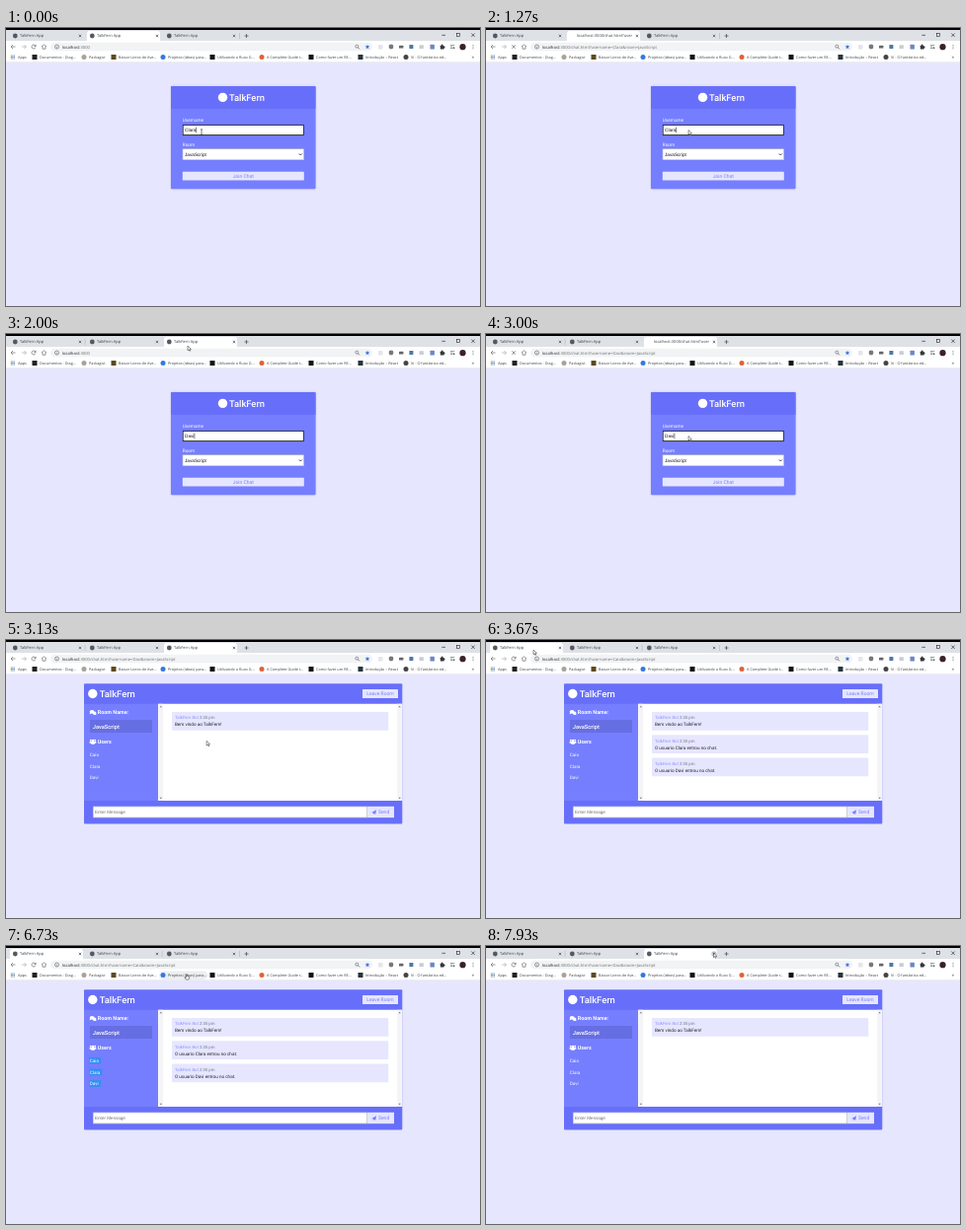
Animation of 480x282 px, one loop 8 s. Source, as an HTML page with a canvas:

```html
<!DOCTYPE html>
<html lang="pt">
<head>
<meta charset="utf-8">
<title>TalkFern App</title>
<style>
html, body { margin: 0; width: 100%; height: 100%; overflow: hidden; background: #e6e6ff; }
canvas { display: block; width: 480px; height: 282px; }
</style>
</head>
<body>
<canvas id="stage"></canvas>
<script>
const W = 480, H = 282, LOOP = 8000;
const canvas = document.getElementById('stage');
const ctx = canvas.getContext('2d');
const ratio = window.devicePixelRatio || 1;
canvas.width = W * ratio;
canvas.height = H * ratio;

const UI = '"Open Sans", "Noto Sans", sans-serif';
const PAGE = 'Roboto, sans-serif';
const FORM = '"Liberation Sans", Arial, sans-serif';
const DARK = '#676ffa', MID = '#757efe', LIGHT = '#e6e6ff', INK = '#3c4043';
const APP = 'TalkFern';
const USERS = ['Caio', 'Clara', 'Davi'];

// Pointer tip: time, x, y
const PATH = [
  [0, 198, 105.5], [70, 198, 105.5], [400, 200, 104], [670, 200, 104], [800, 205, 103.5],
  [1300, 205, 103.5], [1760, 184, 12], [2130, 184, 12], [2450, 205, 103.5], [3100, 205, 103.5],
  [3580, 48, 10], [3740, 48, 10], [4000, 200, 80], [4240, 236, 122], [4520, 84, 115],
  [4600, 84, 115], [4730, 90, 115], [4870, 90, 115], [5180, 102, 144], [5330, 102, 144],
  [5660, 105, 100], [5730, 105, 100], [5950, 100, 168], [6220, 128, 100], [6530, 156, 36],
  [6720, 183, 29], [6890, 180, 10], [7020, 180, 10], [7400, 78, 24], [7470, 78, 24],
  [7900, 230.5, 7], [8000, 230.5, 7]
];

const BOOKMARKS = [
  [29, 'Documentos - Diag...', '#222', 0], [79, 'Packagist', '#a8a29a', 1],
  [109, 'Baixar Livros de Ave...', '#5c4a20', 0], [159, 'Projetos (ideas) para...', '#3478e0', 1],
  [209, 'Utilizando o fluxo G...', '#111', 0], [259, 'A Complete Guide t...', '#e0603c', 1],
  [309, 'Como fazer um RE...', '#111', 0], [359, 'Introdução – React', '#26343c', 0],
  [405, 'Vi - O fantástico ed...', '#444', 1]
];

function pointer(t) {
  let i = 1;
  while (i < PATH.length - 1 && PATH[i][0] < t) i++;
  const [t0, x0, y0] = PATH[i - 1], [t1, x1, y1] = PATH[i];
  const p = Math.min(1, Math.max(0, (t - t0) / (t1 - t0)));
  const e = p * p * (3 - 2 * p);
  return { x: x0 + (x1 - x0) * e, y: y0 + (y1 - y0) * e };
}

function rect(x, y, w, h, fill, r = 0) {
  ctx.fillStyle = fill;
  ctx.beginPath();
  ctx.roundRect(x, y, w, h, r);
  ctx.fill();
}

function frame(x, y, w, h, color, width) {
  ctx.strokeStyle = color;
  ctx.lineWidth = width;
  ctx.strokeRect(x, y, w, h);
}

function disc(x, y, r, fill) {
  ctx.fillStyle = fill;
  ctx.beginPath();
  ctx.arc(x, y, r, 0, Math.PI * 2);
  ctx.fill();
}

function ring(x, y, r, color, from = 0, to = Math.PI * 2) {
  ctx.strokeStyle = color;
  ctx.lineWidth = 0.65;
  ctx.beginPath();
  ctx.arc(x, y, r, from, to);
  ctx.stroke();
}

function line(points, color, width = 0.65) {
  ctx.strokeStyle = color;
  ctx.lineWidth = width;
  ctx.beginPath();
  for (let i = 0; i < points.length; i += 2) ctx.lineTo(points[i], points[i + 1]);
  ctx.stroke();
}

function shape(points, fill) {
  ctx.fillStyle = fill;
  ctx.beginPath();
  for (let i = 0; i < points.length; i += 2) ctx.lineTo(points[i], points[i + 1]);
  ctx.closePath();
  ctx.fill();
}

function text(s, x, y, size, color, family = PAGE, weight = 400, align = 'left') {
  ctx.font = `${weight} ${size}px ${family}`;
  ctx.textAlign = align;
  ctx.fillStyle = color;
  ctx.fillText(s, x, y);
  return ctx.measureText(s).width;
}

function cross(x, y, r, color) {
  line([x - r, y - r, x + r, y + r], color);
  line([x - r, y + r, x + r, y - r], color);
}

function tabs(s, mouse) {
  rect(0, 0, W, 13, '#dee1e6');
  rect(0, 0, W, 2, '#000');
  for (let i = 0; i < 3; i++) {
    const x = 2 + i * 78;
    const over = mouse.y < 14 && mouse.x > x + 2 && mouse.x < x + 77;
    if (i === s.tab) {
      rect(x + 2, 3, 74, 11, '#fff', [2.5, 2.5, 0, 0]);
    } else if (over) {
      rect(x + 2, 3, 74, 10, '#edeff2', [2.5, 2.5, 0, 0]);
    }
    ctx.save();
    ctx.beginPath();
    ctx.rect(x, 2, 68, 11);
    ctx.clip();
    if (i === s.tab && s.loading) {
      text('localhost:3000/chat.html?userna', x + 12, 9.3, 4, INK, UI);
    } else {
      disc(x + 7.3, 8, 2.4, '#55595e');
      text(APP + ' App', x + 12, 9.3, 4, INK, UI);
    }
    ctx.restore();
    if (mouse.y < 10 && Math.abs(mouse.x - x - 73) < 3) disc(x + 73, 8, 2.7, '#c9ccd1');
    cross(x + 73, 8, 1.2, INK);
    if (i < 2 && i !== s.tab && i + 1 !== s.tab) line([x + 78, 5, x + 78, 11], '#9a9da2', 0.4);
  }
  if (s.tab !== 2) line([236.5, 5, 236.5, 11], '#9a9da2', 0.4);
  line([241.5, 8, 245.5, 8], INK);
  line([243.5, 6, 243.5, 10], INK);
  line([441.3, 7.3, 445, 7.3], '#222');
  frame(456.5, 5.6, 3, 3, '#222', 0.6);
  cross(473, 7.2, 1.7, '#222');
}

function toolbar(s) {
  rect(0, 13, W, 22, '#fff');
  const gray = '#5f6368';
  line([9.5, 19, 5, 19], gray);
  line([7, 17, 5, 19, 7, 21], gray);
  line([16, 19, 20.5, 19], '#a4a7ab');
  line([18.5, 17, 20.5, 19, 18.5, 21], '#a4a7ab');
  if (s.loading) {
    cross(28, 19, 1.8, gray);
  } else {
    ring(28, 19, 2, gray, 0.3, 5.6);
    shape([30.4, 16.5, 30.4, 18.7, 28.2, 18.7], gray);
  }
  line([36, 19, 38.5, 16.8, 41, 19], gray);
  line([37, 18.5, 37, 21.2, 40, 21.2, 40, 18.5], gray);

  rect(45, 14.7, 326, 8.6, '#f1f3f4', 4.3);
  ring(51.5, 19, 2, gray);
  line([51.5, 18.7, 51.5, 20.2], gray, 0.5);
  const host = text('localhost', 57, 20.5, 4.15, '#202124', UI);
  text(':3000' + s.query, 57 + host, 20.5, 4.15, '#6b6f74', UI);

  ring(355.3, 18.6, 1.5, gray);
  line([356.4, 19.7, 358, 21.3], gray, 0.8);
  const star = [];
  for (let i = 0; i < 11; i++) {
    const a = i * Math.PI / 5 - Math.PI / 2, r = i % 2 ? 1.1 : 2.5;
    star.push(366 + r * Math.cos(a), 19.2 + r * Math.sin(a));
  }
  shape(star, '#3a72dc');

  rect(377, 17, 4.5, 4.5, '#e4e6e8', 0.5);
  disc(390, 19, 2.4, '#75797d');
  rect(398, 17.8, 4.4, 2.6, '#666', 0.5);
  rect(408.4, 17, 4, 4, '#4b78a8');
  rect(418.5, 17.2, 4.4, 3.8, '#c9cdd4', 0.5);
  rect(429.5, 16.8, 4.4, 4.6, '#6c87c6', 0.5);
  rect(439.8, 17.8, 3.8, 3.7, '#35383b', 0.4);
  disc(441.6, 17.5, 0.9, '#35383b');
  disc(443.7, 19.6, 0.9, '#35383b');
  for (let i = 0; i < 3; i++) line([450, 17.4 + i * 1.6, i ? 452.5 : 454.3, 17.4 + i * 1.6], gray);
  disc(453.6, 20.2, 0.9, gray);
  disc(462.5, 19.2, 3.1, '#3a2026');
  for (let i = 0; i < 3; i++) disc(473, 17.2 + i * 1.8, 0.5, gray);
}

function bookmarks(mouse) {
  if (mouse.y > 25 && mouse.y < 35 && mouse.x > 155 && mouse.x < 204) {
    rect(155, 25.5, 49, 8.5, '#eceef0', 4.2);
  }
  for (let i = 0; i < 9; i++) {
    const tint = ['#d65a4a', '#4f8a5b', '#4a79cf'][i % 3];
    rect(4.8 + (i % 3) * 1.5, 27.5 + Math.floor(i / 3) * 1.5, 1, 1, tint);
  }
  text('Apps', 12, 31, 3.8, INK, UI);
  for (const [x, label, tint, round] of BOOKMARKS) {
    if (round) disc(x, 29.6, 2.5, tint);
    else rect(x - 2.5, 27.1, 5, 5, tint, 0.4);
    text(label, x + 5, 31, 3.8, INK, UI);
  }
  text('»', 471.5, 31, 5, INK, UI);
  rect(0, 34.6, W, 0.5, '#dcdde2');
}

function login(name) {
  ctx.save();
  ctx.shadowColor = 'rgba(70,70,140,.3)';
  ctx.shadowBlur = 2 * ratio;
  rect(167, 59, 146.5, 104.3, MID, 1);
  ctx.restore();
  rect(167, 59, 146.5, 23, DARK, [1, 1, 0, 0]);
  disc(219.5, 70.4, 4.7, '#fff');
  text(APP, 226, 74, 9.4, '#fff', PAGE, 500);

  text('Username', 178.8, 95.2, 4.7, '#fff');
  rect(178.8, 98, 123, 11, '#fff');
  frame(179.2, 98.4, 122.2, 10.2, '#1c1c28', 0.9);
  const w = text(name, 181, 105, 4.7, '#111', FORM);
  rect(181.3 + w, 100.8, 0.5, 5.4, '#000');

  text('Room', 178.8, 119.8, 4.7, '#fff');
  rect(178.8, 122.5, 123, 11.5, '#fff');
  frame(179, 122.7, 122.6, 11.1, '#8a8a9a', 0.4);
  text('JavaScript', 181, 129.9, 4.7, '#111', FORM);
  line([296.8, 127.5, 298.3, 129, 299.8, 127.5], '#222', 0.8);

  rect(178.8, 145.8, 123, 8.8, LIGHT, 0.6);
  text('Join Chat', 240.3, 152, 5, MID, PAGE, 400, 'center');
}

function peopleIcon(x, y) {
  disc(x - 2.2, y - 1.5, 0.95, '#fff');
  disc(x + 2.2, y - 1.5, 0.95, '#fff');
  rect(x - 3.5, y - 0.3, 7, 1.8, '#fff', 0.7);
  disc(x, y - 1.1, 1.3, '#fff');
  rect(x - 2, y + 0.5, 4, 2, '#fff', 0.8);
}

function chatIcon(x, y) {
  ctx.fillStyle = '#fff';
  ctx.beginPath();
  ctx.ellipse(x - 0.9, y - 0.6, 2.4, 1.8, 0, 0, 7);
  ctx.ellipse(x + 1.5, y + 0.8, 2, 1.6, 0, 0, 7);
  ctx.fill();
  shape([x - 3, y, x - 3.3, y + 1.8, x - 1, y + 1], '#fff');
  shape([x + 3, y + 1, x + 3.4, y + 2.8, x + 1, y + 2.2], '#fff');
}

function scrollbar(x, top, bottom) {
  rect(x - 2.3, top, 4.6, bottom - top, '#f4f4f6');
  shape([x - 1.2, top + 3.4, x + 1.2, top + 3.4, x, top + 2], '#777');
  shape([x - 1.2, bottom - 3.2, x + 1.2, bottom - 3.2, x, bottom - 1.8], '#777');
}

function chat(count, messages, marked) {
  const end = count > 2 ? 163 : 151.3;
  rect(79, 44.3, 322.3, end - 20.9, DARK, 1);
  disc(87.8, 54.5, 4.7, '#fff');
  text(APP, 94.8, 58, 9.4, '#fff', PAGE, 500);
  rect(361, 50, 36, 9, LIGHT, 0.5);
  text('Leave Room', 379, 56.3, 5, MID, PAGE, 400, 'center');

  rect(79, 64.8, 75, end - 64.8, MID);
  chatIcon(88, 73.4);
  text('Room Name:', 92.8, 75.3, 5.4, '#fff', PAGE, 700);
  rect(85, 81, 63, 13, '#666ee3');
  text('JavaScript', 87.8, 89.5, 5.7, '#fff', PAGE, 500);
  peopleIcon(88, 103.2);
  text('Users', 92.8, 105.2, 5.4, '#fff', PAGE, 700);
  for (let i = 0; i < count; i++) {
    const y = 117.9 + i * 11.6;
    const part = Math.min(1, Math.max(0, marked - i));
    if (part) rect(84.3, y - 5, (i === 1 ? 13 : 11.8) * part, 6.7, '#3390f2');
    text(USERS[i], 84.8, y, 4.6, '#fff');
  }

  rect(154, 64.8, 247.3, end - 64.8, '#fff');
  scrollbar(156.8, 64.8, end);
  scrollbar(398.6, 64.8, end);
  messages.forEach((body, i) => {
    const y = 73 + i * 23.2;
    rect(168, y, 219.3, 18.8, LIGHT, 0.8);
    const w = text(APP + ' Bot ', 171, y + 7.4, 4.3, '#8d95fa');
    text('2:35 pm', 171 + w, y + 7.4, 4.3, '#777789');
    text(body, 171, y + 14.3, 4.6, '#22222c');
  });

  rect(88, end + 5.8, 278, 11.4, '#fff');
  frame(88.2, end + 6, 277.6, 11, '#8888a8', 0.4);
  text('Enter Message', 90, end + 13, 4.6, '#71717a', FORM);
  rect(366, end + 5.8, 27, 11.4, LIGHT);
  const y = end + 11.5;
  shape([370.3, y + 0.5, 375, y - 2.2, 374.2, y + 2.2, 372.8, y + 1.5, 372.2, y + 2.5, 371.8, y + 1.1], MID);
  text('Send', 377, end + 13.3, 5, MID);
}

function drawPointer(mouse, kind) {
  const { x, y } = mouse;
  if (kind === 'beam') {
    line([x, y - 2.7, x, y + 2.7], '#222', 0.6);
    line([x - 1.1, y - 2.7, x + 1.1, y - 2.7], '#222', 0.5);
    line([x - 1.1, y + 2.7, x + 1.1, y + 2.7], '#222', 0.5);
    return;
  }
  ctx.save();
  ctx.translate(x, y);
  if (kind === 'hand') {
    shape([-0.5, 0, 0.5, 0, 0.7, 1.9, 2.6, 2.4, 2.6, 4, 1.9, 5.3, -0.7, 5.3, -2, 3, -0.5, 3.2], '#fff');
    line([-0.5, 3.2, -0.5, 0, 0.5, 0, 0.7, 1.9, 2.6, 2.4, 2.6, 4, 1.9, 5.3, -0.7, 5.3, -2, 3, -0.5, 3.2], '#222', 0.5);
  } else {
    const arrow = [0, 0, 0, 4.7, 1.1, 3.7, 1.9, 5.4, 2.7, 5, 2, 3.4, 3.4, 3.3];
    shape(arrow, '#fff');
    line(arrow.concat(0, 0), '#222', 0.5);
  }
  ctx.restore();
}

function stateAt(t) {
  const tab = t < 1900 ? 1 : t < 3600 ? 2 : t < 6950 ? 0 : 2;
  const loading = (t >= 1200 && t < 1400) || (t >= 2870 && t < 3130);
  const form = t < 1400 || (t >= 1900 && t < 3130);
  const sent = !form || loading;
  const user = USERS[[0, 1, 2][tab]];
  return {
    tab, loading, form, user,
    query: sent ? `/chat.html?username=${user}&room=JavaScript` : ''
  };
}

function selection(t) {
  if (t < 4600) return 0;
  if (t < 4870) return Math.min(1, (t - 4600) / 130);
  return Math.min(3, 1 + (t - 4870) / 150);
}

function draw(t) {
  ctx.setTransform(ratio, 0, 0, ratio, 0, 0);
  ctx.textRendering = 'geometricPrecision';
  const s = stateAt(t), mouse = pointer(t);
  rect(0, 0, W, H, LIGHT);
  tabs(s, mouse);
  toolbar(s);
  bookmarks(mouse);
  if (s.form) {
    login(s.user);
  } else {
    const messages = [`Bem vindo ao ${APP}!`];
    if (s.tab === 0) {
      for (const name of USERS.slice(1)) messages.push(`O usuario ${name} entrou no chat.`);
    }
    chat(s.tab === 1 ? 2 : 3, messages, s.tab === 0 ? selection(t) : 0);
  }
  const onField = s.form && !s.loading && mouse.y > 98 && mouse.y < 109;
  const onLink = mouse.y > 26 && mouse.y < 34 && mouse.x > 155;
  drawPointer(mouse, onField ? 'beam' : onLink ? 'hand' : 'arrow');
}

const start = performance.now();
function tick() {
  draw((performance.now() - start) % LOOP);
  requestAnimationFrame(tick);
}
tick();
</script>
</body>
</html>
```
